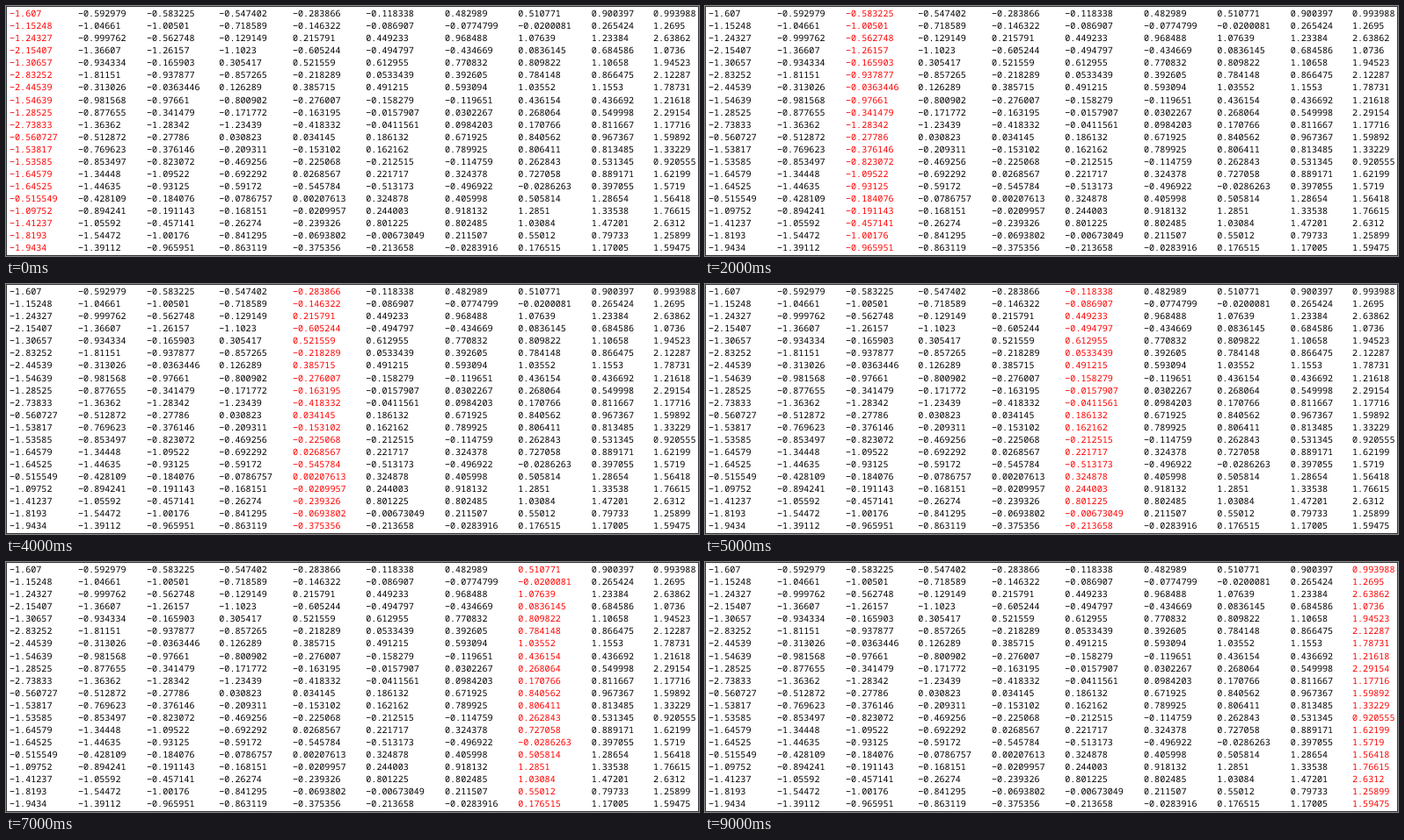
An HTML page that plays this animation: 788x285 px, repeating every 10 s.

```html
<!DOCTYPE html>
<html lang="en">
<head>
<meta charset="utf-8">
<title>Sorted samples</title>
<style>
  html, body { margin: 0; width: 100%; height: 100%; overflow: hidden; background: #fff; }
  body { position: relative; box-shadow: inset 0 0 0 1px #333; }
  pre {
    position: absolute;
    top: 1px;
    margin: 0;
    color: #000;
    font: 500 10.1px/14.08px "Noto Sans Mono", "DejaVu Sans Mono", monospace;
    text-rendering: geometricPrecision;
  }
</style>
</head>
<body>
<pre>
−1.607
−1.15248
−1.24327
−2.15407
−1.30657
−2.83252
−2.44539
−1.54639
−1.28525
−2.73833
−0.560727
−1.53817
−1.53585
−1.64579
−1.64525
−0.515549
−1.09752
−1.41237
−1.8193
−1.9434</pre>
<pre>
−0.592979
−1.04661
−0.999762
−1.36607
−0.934334
−1.81151
−0.313026
−0.981568
−0.877655
−1.36362
−0.512872
−0.769623
−0.853497
−1.34448
−1.44635
−0.428109
−0.894241
−1.05592
−1.54472
−1.39112</pre>
<pre>
−0.583225
−1.00501
−0.562748
−1.26157
−0.165903
−0.937877
−0.0363446
−0.97661
−0.341479
−1.28342
−0.27786
−0.376146
−0.823072
−1.09522
−0.93125
−0.184076
−0.191143
−0.457141
−1.00176
−0.965951</pre>
<pre>
−0.547402
−0.718589
−0.129149
−1.1023
0.305417
−0.857265
0.126289
−0.800902
−0.171772
−1.23439
0.030823
−0.209311
−0.469256
−0.692292
−0.59172
−0.0786757
−0.168151
−0.26274
−0.841295
−0.863119</pre>
<pre>
−0.283866
−0.146322
0.215791
−0.605244
0.521559
−0.218289
0.385715
−0.276007
−0.163195
−0.418332
0.034145
−0.153102
−0.225068
0.0268567
−0.545784
0.00207613
−0.0209957
−0.239326
−0.0693802
−0.375356</pre>
<pre>
−0.118338
−0.086907
0.449233
−0.494797
0.612955
0.0533439
0.491215
−0.158279
−0.0157907
−0.0411561
0.186132
0.162162
−0.212515
0.221717
−0.513173
0.324878
0.244003
0.801225
−0.00673049
−0.213658</pre>
<pre>
0.482989
−0.0774799
0.968488
−0.434669
0.770832
0.392605
0.593094
−0.119651
0.0302267
0.0984203
0.671925
0.789925
−0.114759
0.324378
−0.496922
0.405998
0.918132
0.802485
0.211507
−0.0283916</pre>
<pre>
0.510771
−0.0200081
1.07639
0.0836145
0.809822
0.784148
1.03552
0.436154
0.268064
0.170766
0.840562
0.806411
0.262843
0.727058
−0.0286263
0.505814
1.2851
1.03084
0.55012
0.176515</pre>
<pre>
0.900397
0.265424
1.23384
0.684586
1.10658
0.866475
1.1553
0.436692
0.549998
0.811667
0.967367
0.813485
0.531345
0.889171
0.397055
1.28654
1.33538
1.47201
0.79733
1.17005</pre>
<pre>
0.993988
1.2695
2.63862
1.0736
1.94523
2.12287
1.78731
1.21618
2.29154
1.17716
1.59892
1.33229
0.920555
1.62199
1.5719
1.56418
1.76615
2.6312
1.25899
1.59475</pre>
<script>
  const STEP = 1000;
  const lefts = [4, 82, 160, 242.3, 326, 409.3, 499, 582.3, 665.7, 736];
  const columns = document.querySelectorAll('pre');
  const duration = STEP * columns.length;

  // Each column is red for one step, then black until its next turn.
  const highlight = [
    { color: '#f00', offset: 0 },
    { color: '#f00', offset: 0.1 },
    { color: '#000', offset: 0.1 },
    { color: '#000', offset: 1 }
  ];

  columns.forEach((column, i) => {
    column.style.left = `${lefts[i]}px`;
    column.animate(highlight, {
      duration,
      delay: i * STEP - duration,
      iterations: Infinity
    });
  });
</script>
</body>
</html>
```
